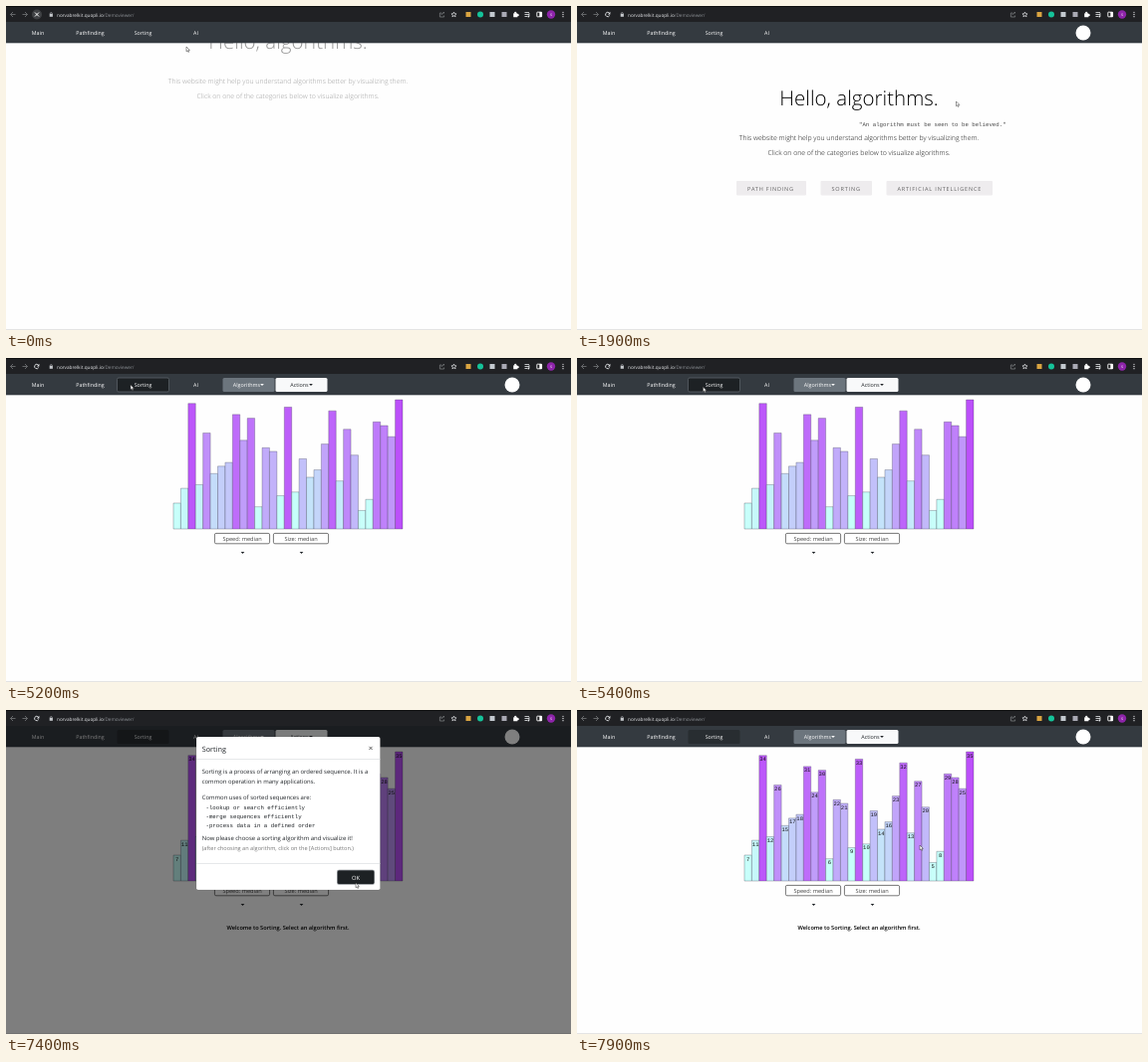
Write an HTML page with a canvas that moves like this. It is 567 px wide and 326 px high and loops after 8000 ms.

```html
<!DOCTYPE html>
<html lang="en">
<head>
<meta charset="utf-8">
<title>Algorithm demo</title>
<style>
html, body { margin: 0; width: 100%; height: 100%; overflow: hidden; background: #fefefe; }
canvas { display: block; width: 567px; height: 326px; }
</style>
</head>
<body>
<canvas id="stage"></canvas>
<script>
const W = 567, H = 326, LOOP = 8000;
const SANS = '"Open Sans", "Noto Sans", sans-serif';
const MONO = '"Liberation Mono", monospace';
const canvas = document.getElementById('stage');
const c = canvas.getContext('2d');
const dpr = window.devicePixelRatio || 1;
canvas.width = W * dpr;
canvas.height = H * dpr;

const BARS = [7, 11, 34, 12, 26, 15, 17, 18, 31, 24, 30, 6, 22, 21, 9, 33,
  10, 19, 14, 16, 23, 32, 13, 27, 20, 5, 8, 29, 28, 25, 35];

// Pointer path: time, x, y
const PATH = [
  [0, 181, 41], [100, 190, 44], [800, 380.5, 96], [3300, 380.5, 96], [3900, 301, 100],
  [4150, 255, 82], [4700, 125, 27], [5300, 125, 27], [5850, 142, 52],
  [6200, 142, 52], [7200, 351, 174], [7600, 351, 174], [7900, 344, 136]
];

const clamp = v => Math.max(0, Math.min(1, v));
const span = (t, a, b) => clamp((t - a) / (b - a));
const easeOut = p => 1 - (1 - p) * (1 - p);
const smooth = p => p * p * (3 - 2 * p);

function text(s, x, y, size, o = {}) {
  c.font = `${o.weight || 400} ${size}px ${o.font || SANS}`;
  c.textAlign = o.align || 'left';
  c.textRendering = 'geometricPrecision';
  c.letterSpacing = (o.spacing || 0) + 'px';
  c.fillStyle = o.color || '#212529';
  c.fillText(s, x, y);
}

function box(x, y, w, h, r, fill, stroke, lw = 0.6) {
  c.beginPath();
  c.roundRect(x, y, w, h, r);
  if (fill) { c.fillStyle = fill; c.fill(); }
  if (stroke) { c.strokeStyle = stroke; c.lineWidth = lw; c.stroke(); }
}

function rect(x, y, w, h, fill) {
  c.fillStyle = fill;
  c.fillRect(x, y, w, h);
}

function disc(x, y, r, fill) {
  c.beginPath();
  c.arc(x, y, r, 0, 7);
  c.fillStyle = fill;
  c.fill();
}

function line(points, color, lw = 0.9) {
  c.beginPath();
  points.forEach(([x, y], i) => i ? c.lineTo(x, y) : c.moveTo(x, y));
  c.strokeStyle = color;
  c.lineWidth = lw;
  c.stroke();
}

function poly(points, fill) {
  c.beginPath();
  points.forEach(([x, y]) => c.lineTo(x, y));
  c.closePath();
  c.fillStyle = fill;
  c.fill();
}

const caret = (x, y, color) => poly([[x - 1.9, y], [x + 1.9, y], [x, y + 2]], color);

function faded(alpha, draw) {
  if (alpha <= 0) return;
  c.save();
  c.globalAlpha = alpha;
  draw();
  c.restore();
}

function browserBar(t) {
  rect(0, 0, W, 16, '#202124');
  rect(0, 0, W, 1, '#0c0d0e');
  for (const [x, d] of [[7, -1], [19, 1]]) {
    line([[x - 2.5, 8.5], [x + 2.5, 8.5]], '#77797c', 0.8);
    line([[x, 6], [x + 2.5 * d, 8.5], [x, 11]], '#77797c', 0.8);
  }
  if (t < 150) {
    disc(31, 8.5, 5, '#3f4144');
    line([[29, 6.5], [33, 10.5]], '#fff', 1);
    line([[33, 6.5], [29, 10.5]], '#fff', 1);
  } else {
    c.beginPath();
    c.arc(30.8, 8.5, 2.2, 0.5, 5.5);
    c.strokeStyle = '#e8eaed';
    c.lineWidth = 0.9;
    c.stroke();
    poly([[33.4, 5.8], [33.4, 8.4], [30.9, 8.4]], '#e8eaed');
  }
  rect(43.7, 7.8, 3.2, 3, '#c4c7cb');
  c.beginPath();
  c.arc(45.3, 7.7, 1.1, Math.PI, 0);
  c.strokeStyle = '#c4c7cb';
  c.lineWidth = 0.6;
  c.stroke();
  const host = 'norvabrelkit.quopli.io';
  text(host, 51, 10.5, 4.7, { color: '#e8eaed' });
  text('/Demoviewer/', 51 + c.measureText(host).width, 10.5, 4.7, { color: '#8d9196' });

  line([[437, 7], [435.4, 7], [435.4, 11], [439.6, 11], [439.6, 9.5]], '#85888b', 0.7);
  line([[437, 9], [438, 7], [440, 7], [439, 6]], '#85888b', 0.7);
  const star = [];
  for (let i = 0; i <= 10; i++) {
    const r = i % 2 ? 1.2 : 2.7, a = i * Math.PI / 5;
    star.push([449.5 + r * Math.sin(a), 8.7 - r * Math.cos(a)]);
  }
  line(star, '#e8eaed', 0.7);
  rect(461.5, 6, 5, 5, '#d9a441');
  disc(476, 8.5, 3, '#15c39a');
  rect(485.5, 6, 5, 5, '#c3c9cf');
  rect(497.5, 6, 5, 5, '#a9a9b4');
  box(509.2, 7.2, 4.2, 4, 0.5, '#fff');
  disc(511.2, 6.8, 1.1, '#fff');
  disc(513.7, 9.2, 1.1, '#fff');
  [6.5, 8.5, 10.5].forEach((y, i) => line([[520.5, y], [i == 2 ? 523 : 525, y]], '#e8eaed', 0.8));
  line([[525, 7], [525, 10.5]], '#e8eaed', 0.7);
  disc(524.3, 10.5, 0.9, '#e8eaed');
  box(532.8, 6.2, 4.8, 4.6, 0.4, null, '#fff', 0.9);
  rect(535.3, 6, 2.5, 5, '#fff');
  disc(547, 8.5, 4.2, '#8e24aa');
  text('s', 547, 10, 4.4, { color: '#fff', align: 'center' });
  [6.3, 8.5, 10.7].forEach(y => disc(559, y, 0.65, '#e8eaed'));
}

function navBar(t) {
  rect(0, 16, W, 21.3, '#343a40');
  const focus = t >= 4600 && t < 7350;
  if (focus) box(111.5, 20, 52, 14, 1.5, '#1d2124', '#5b6167', 0.8);
  else if (t >= 7350) box(111.5, 20, 52, 14, 1.5, '#282d31');
  [['Main', 32], ['Pathfinding', 84.5], ['Sorting', 137.5], ['AI', 190.5]]
    .forEach(([s, x]) => text(s, x, 29.1, 5.3, { color: '#fff', align: 'center' }));
  if (t >= 5000) {
    box(217.5, 20, 52, 14, 1.5, '#6c757d');
    text('Algorithms', 241.5, 29.1, 5.4, { color: '#fff', align: 'center' });
    caret(257, 26, '#fff');
    box(270.5, 20, 52, 14, 1.5, '#f8f9fa');
    text('Actions', 294.5, 29.1, 5.4, { align: 'center' });
    caret(306, 26, '#212529');
  }
  if (t >= 150) disc(508, 27, 7.5, '#fff');
}

function homePage(t) {
  const dy = -57 * (1 - easeOut(span(t, 0, 800)));
  faded(0.4 + 0.6 * span(t, 0, 800), () => {
    text('Hello, algorithms.', 283, 100 + dy, 20.5, { weight: 300, align: 'center', color: '#000' });
    const p = { weight: 300, align: 'center', color: '#111' };
    text('This website might help you understand algorithms better by visualizing them.', 283, 135 + dy, 6.9, p);
    text('Click on one of the categories below to visualize algorithms.', 283, 150 + dy, 6.9, p);
  });
  const plate = span(t, 300, 1000), label = span(t, 300, 2800);
  [['PATH FINDING', 160, 70], ['SORTING', 244.5, 51.5], ['ARTIFICIAL INTELLIGENCE', 310.5, 106.5]]
    .forEach(([s, x, w]) => {
      faded(plate, () => box(x, 176, w, 14.5, 0.8, '#eeecee'));
      faded(label, () => text(s, x + 11, 185.5, 5.5, { spacing: 0.84, color: '#111' }));
    });
  const out = span(t, 3300, 4000);
  faded(span(t, 950, 1800) * (1 - out), () =>
    text('"An algorithm must be seen to be believed."', 283 - 25 * out, 121 - 13 * out, 5.73,
      { font: MONO, color: '#4a4a4a' }));
}

function sortPage(t) {
  const w = 230 / BARS.length, unit = 130 / 35, base = 172;
  BARS.forEach((v, i) => {
    const x = 168 + i * w, h = v * unit;
    const g = Math.min(255, 255 - (v - 10) * 7);
    box(x, base - h, w, h, 0, `rgb(${202 - v * 0.4}, ${g}, 250)`, 'rgba(50,50,70,.6)', 0.5);
    if (t >= 5500) text(v, x + w / 2, base - h + 5.6, 5.5, { font: MONO, align: 'center', color: '#111' });
  });
  [['Speed: median', 209], ['Size: median', 268]].forEach(([s, x]) => {
    box(x + 0.4, 176.4, 55.2, 10.4, 1.5, '#fff', '#555', 0.8);
    text(s, x + 28, 183.8, 5.65, { align: 'center', color: '#444' });
    caret(x + 28.5, 195, '#212529');
  });
  faded(span(t, 5500, 6500), () =>
    text('Welcome to Sorting. Select an algorithm first.', 283, 221.2, 5.67,
      { weight: 600, align: 'center', color: '#000' }));
}

function modal(t) {
  box(191, 27, 184.5, 154, 1.8, '#fff', 'rgba(0,0,0,.25)', 0.4);
  text('Sorting', 196.7, 41.6, 7.3, { weight: 500 });
  line([[364.4, 36.8], [367.6, 40]], '#555', 0.9);
  line([[367.6, 36.8], [364.4, 40]], '#555', 0.9);
  rect(191, 49.4, 184.5, 0.6, '#d5d9dd');
  rect(191, 154.4, 184.5, 0.6, '#d5d9dd');
  [['Sorting is a process of arranging an ordered sequence. It is a', 64],
   ['common operation in many applications.', 74],
   ['Common uses of sorted sequences are:', 90.2],
   ['Now please choose a sorting algorithm and visualize it!', 131]]
    .forEach(([s, y]) => text(s, 196.7, y, 5.95));
  ['-lookup or search efficiently', '-merge sequences efficiently', '-process data in a defined order']
    .forEach((s, i) => text(s, 200.5, 99.7 + 9.1 * i, 5.73, { font: MONO }));
  text('(after choosing an algorithm, click on the [Actions] button.)', 196.7, 140.9, 5.6, { color: '#777' });
  const hover = t >= 7150;
  if (t >= 7350) box(332, 160.7, 38, 15, 2, '#8b9095');
  box(332.8, 161.5, 36.5, 13.5, 1.5, hover ? '#1d2124' : '#343a40');
  text('OK', 351, 170.5, 5.8, { color: '#fff', align: 'center' });
}

function pointer(t) {
  let i = PATH.length - 1;
  while (PATH[i][0] > t) i--;
  const a = PATH[i], b = PATH[i + 1] || a;
  const p = b === a ? 0 : smooth(span(t, a[0], b[0]));
  const x = a[1] + (b[1] - a[1]) * p, y = a[2] + (b[2] - a[2]) * p;
  const shape = [[0, 0], [0, 4.8], [1.1, 3.8], [1.9, 5.5], [2.7, 5.1], [2, 3.5], [3.4, 3.4], [0, 0]]
    .map(([u, v]) => [x + u, y + v]);
  poly(shape, '#fff');
  line(shape, '#444', 0.55);
}

function draw(t) {
  c.setTransform(dpr, 0, 0, dpr, 0, 0);
  rect(0, 0, W, H, '#fefefe');
  rect(0, 325, W, 1, '#e4e4e4');
  if (t < 5000) homePage(t); else sortPage(t);
  navBar(t);
  const show = span(t, 5500, 5650) * (1 - span(t, 7700, 7860));
  faded(show * 0.5, () => rect(0, 16, W, H - 16, '#000'));
  browserBar(t);
  const slide = easeOut(span(t, 5550, 5850)) * (1 - span(t, 7650, 7850));
  faded(slide, () => {
    c.translate(0, -18 * (1 - slide));
    modal(t);
  });
  pointer(t);
}

function tick(now) {
  draw(now % LOOP);
  requestAnimationFrame(tick);
}
requestAnimationFrame(tick);
</script>
</body>
</html>
```
